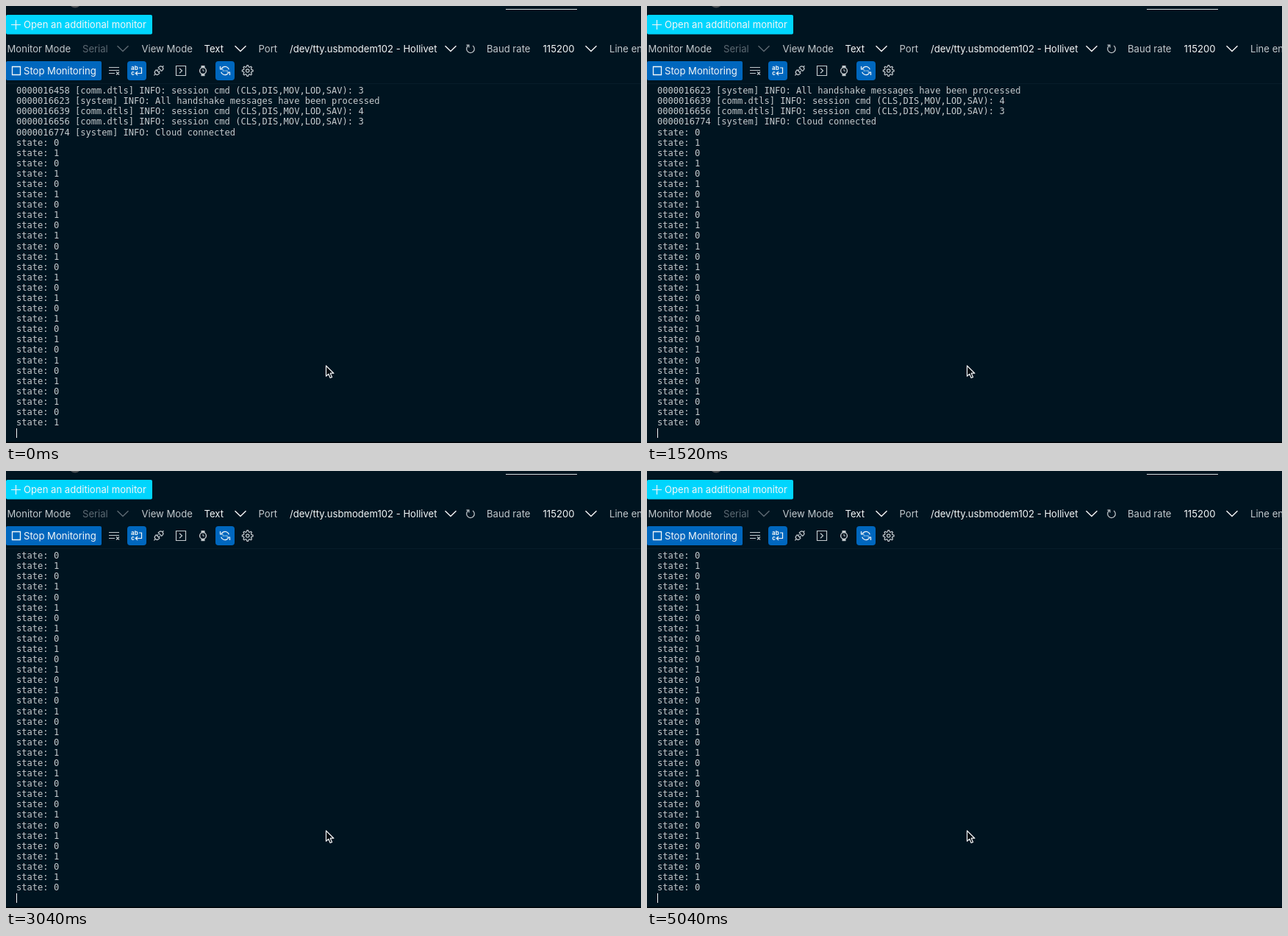
Animation, 864 px wide and 594 px high, one loop 5600 ms. Source, as an HTML page with a canvas:

```html
<!DOCTYPE html>
<html lang="en">
<head>
<meta charset="utf-8">
<title>Serial monitor</title>
<style>
html, body { margin: 0; width: 100%; height: 100%; overflow: hidden; background: #001420; }
canvas { display: block; }
</style>
</head>
<body>
<canvas id="stage" width="864" height="594"></canvas>
<script>
const ctx = document.getElementById('stage').getContext('2d');
const LOOP = 5600, ROWS = 33, ROW_H = 14.09, LEFT = 14, FIRST_BASE = 119.2;
const UI = '13.1px Inter, "Open Sans", sans-serif';
const MONO = '12.09px "DejaVu Sans Mono", "Liberation Mono", monospace';
const BG = '#001420', WHITE = '#f4f6f7', LABEL = '#c3c9cd', DIM = '#5c6972', BLUE = '#0067be';

const session = (stamp, n) => `${stamp} [comm.dtls] INFO: session cmd (CLS,DIS,MOV,LOD,SAV): ${n}`;
const header = [
  session('0000016458', 3),
  '0000016623 [system] INFO: All handshake messages have been processed',
  session('0000016639', 4),
  session('0000016656', 3),
  '0000016774 [system] INFO: Cloud connected'
];
const arrivals = [1440, 2400, 2480, 2880, 3040, 3360, 3520, 3840, 3920, 4400, 4480];
const partials = [1360, 2320, 2800, 2960, 4320];

const lineAt = i => i < header.length ? header[i] : 'state: ' + (i - header.length) % 2;

function text(str, x, y, color, font = UI) {
  ctx.font = font;
  ctx.fillStyle = color;
  ctx.fillText(str, x, y);
}

function box(x, y, w, h, color, r = 0) {
  ctx.fillStyle = color;
  ctx.beginPath();
  ctx.roundRect(x, y, w, h, r);
  ctx.fill();
}

function stroke(d, color = LABEL, width = 1.2) {
  ctx.strokeStyle = color;
  ctx.lineWidth = width;
  ctx.stroke(new Path2D(d));
}

function ring(x, y, r, from = 0, to = Math.PI * 2, color = LABEL, width = 1.2) {
  ctx.strokeStyle = color;
  ctx.lineWidth = width;
  ctx.beginPath();
  ctx.arc(x, y, r, from, to);
  ctx.stroke();
}

const chevron = (x, color) => stroke(`M${x - 7.5} 54.2l7.5 7.4l7.5 -7.4`, color, 1.4);

function drawTop() {
  ctx.fillStyle = '#4b5054';
  ctx.beginPath();
  ctx.arc(94, -5.5, 8, 0, Math.PI * 2);
  ctx.fill();
  box(680, 4, 97, 1, '#d5dadd');
  box(0, 12, 199, 26.5, '#00d5fd', 2);
  stroke('M7 25.5h13M13.5 19v13', WHITE, 1.2);
  text('Open an additional monitor', 24, 30.2, WHITE);
}

function drawSettings() {
  const y = 62.6;
  text('Monitor Mode', 1.5, y, LABEL);
  text('Serial', 104, y, DIM);
  chevron(159, DIM);
  text('View Mode', 184.5, y, LABEL);
  text('Text', 269.5, y, WHITE);
  chevron(319, WHITE);
  text('Port', 343.5, y, LABEL);
  text('/dev/tty.usbmodem102 - Hollivet', 386, y, WHITE);
  chevron(605, WHITE);
  ring(632, 58.3, 5.3, -0.95, Math.PI * 1.3, LABEL);
  stroke('M626.5 53.2h3.4v3.4', LABEL);
  text('Baud rate', 654, y, LABEL);
  text('115200', 730.5, y, WHITE);
  chevron(796, WHITE);
  text('Line ending', 821, y, LABEL);
}

function drawGear(x, y) {
  ring(x, y, 2.2);
  ctx.beginPath();
  for (let i = 0; i < 32; i++) {
    const a = (i - 0.5) * Math.PI / 16;
    const r = i % 4 < 2 ? 7.4 : 5.4;
    ctx.lineTo(x + r * Math.cos(a), y + r * Math.sin(a));
  }
  ctx.closePath();
  ctx.stroke();
}

function drawPlug(x, y) {
  ctx.save();
  ctx.translate(x, y);
  ctx.rotate(-Math.PI / 4);
  stroke('M-9 0h3M-1.5 -3.2h-1.5a3.2 3.2 0 0 0 0 6.4h1.5zM-1.5 -1.6h2.5M-1.5 1.6h2.5' +
    'M2.5 -3.2h1.5a3.2 3.2 0 0 1 0 6.4h-1.5zM7 0h2.5');
  ctx.restore();
}

function drawTools() {
  box(0, 75, 130, 26, BLUE, 2);
  stroke('M8.5 82.5h11v11h-11z', WHITE, 1.3);
  text('Stop Monitoring', 24, 92.7, WHITE);

  stroke('M140 83.5h14M140 87.5h14M140 91.5h8M150 89.5l4 4M154 89.5l-4 4', LABEL, 1.1);

  box(165, 75, 26, 26, BLUE, 4);
  const small = 'bold 8px Inter, sans-serif';
  text('ab', 170, 87, WHITE, small);
  text('c', 170.3, 94, WHITE, small);
  stroke('M181 84h3.5v7.5h-8M179 89l-2.7 2.5l2.7 2.5', WHITE, 1.2);

  drawPlug(207.7, 88);
  stroke('M231.5 81.5h13v13h-13zM236 84.8l3.5 3.2l-3.5 3.2', LABEL, 1.2);

  ring(268, 88, 4.4, 0, Math.PI * 2, LABEL, 1.4);
  box(265.5, 81, 5, 3.2, LABEL);
  box(265.5, 92, 5, 3.2, LABEL);
  stroke('M268 85.8v2.4h1.8', LABEL, 1);

  box(285, 75, 26, 26, BLUE, 4);
  ring(298, 88, 5.6, Math.PI * 1.12, Math.PI * 1.9, WHITE);
  ring(298, 88, 5.6, Math.PI * 0.12, Math.PI * 0.9, WHITE);
  stroke('M291.5 82v4h4M304.5 94v-4h-4', WHITE);
  for (const dx of [-2.5, 0, 2.5]) box(297.4 + dx, 87.4, 1.3, 1.3, WHITE);

  drawGear(328.7, 88);
}

function drawLog(t) {
  const first = arrivals.filter(a => a <= t).length;
  for (let i = 0; i < ROWS; i++) {
    text(lineAt(first + i), LEFT, FIRST_BASE + i * ROW_H, '#c5cacd', MONO);
  }
  const typed = partials.some(p => t >= p && t < p + 80) ? 's' : '';
  text(typed, LEFT, FIRST_BASE + ROWS * ROW_H, '#c5cacd', MONO);
  box(LEFT + Math.round(ctx.measureText(typed).width), 574, 1, 13, WHITE);
}

function drawPointer() {
  const shape = new Path2D('M435.5 489v14.2l3.3 -3.1l2.3 5.4l2.5 -1.1l-2.3 -5.2h4.6z');
  ctx.fillStyle = '#050c12';
  ctx.fill(shape);
  ctx.strokeStyle = WHITE;
  ctx.lineWidth = 1.2;
  ctx.lineJoin = 'round';
  ctx.stroke(shape);
  ctx.lineJoin = 'miter';
}

function frame() {
  const t = performance.now() % LOOP;
  box(0, 0, 864, 594, BG);
  drawTop();
  drawSettings();
  drawTools();
  box(0, 105, 864, 1, '#071d2a');
  drawLog(t);
  drawPointer();
  box(0, 592.5, 864, 1.5, '#000509');
  requestAnimationFrame(frame);
}
frame();
</script>
</body>
</html>
```
